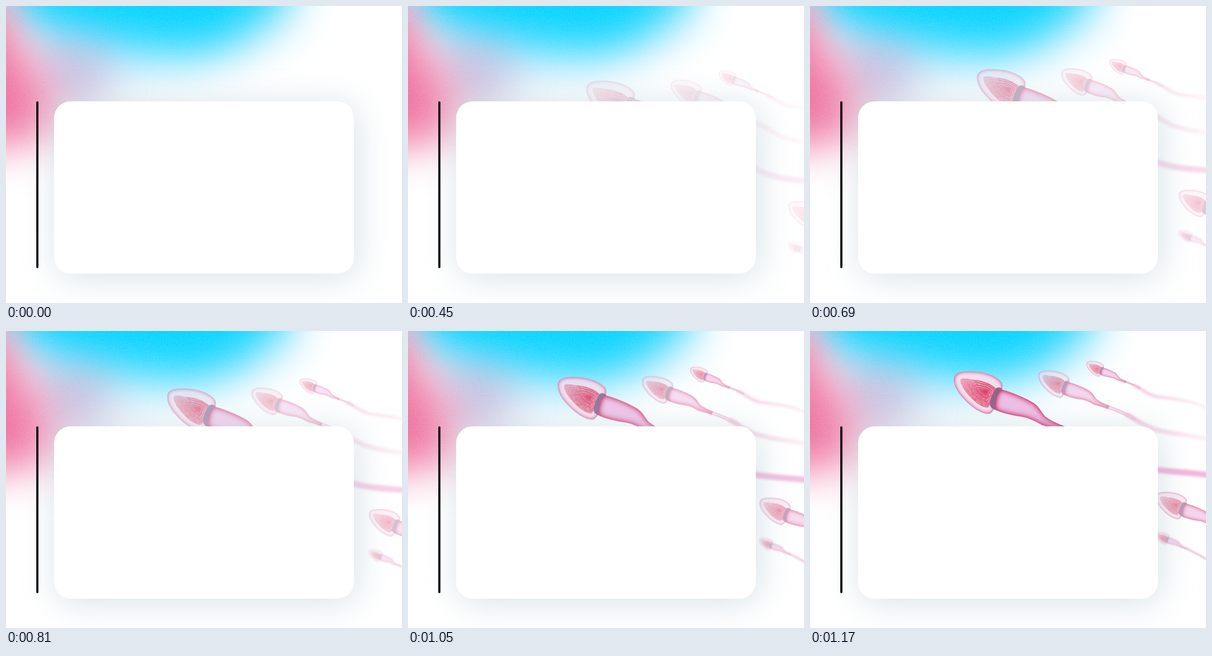
Recreate the animation shown at these times as an HTML page. Size 864 by 648 pixels, loop 1200 ms.

```html
<!DOCTYPE html>
<html lang="en">
<head>
<meta charset="utf-8">
<title>Swimming cells</title>
<style>
  html, body { margin: 0; width: 100%; height: 100%; overflow: hidden; background: #fff; }
  svg { display: block; width: 864px; height: 648px; }
</style>
</head>
<body>
<svg viewBox="0 0 864 648" xmlns="http://www.w3.org/2000/svg">
  <defs>
    <filter id="glow" filterUnits="userSpaceOnUse" x="-400" y="-400" width="1500" height="1200" color-interpolation-filters="sRGB">
      <feGaussianBlur stdDeviation="47"/>
    </filter>
    <filter id="shade" filterUnits="userSpaceOnUse" x="-100" y="0" width="1100" height="800" color-interpolation-filters="sRGB">
      <feGaussianBlur stdDeviation="38"/>
    </filter>
    <filter id="grain" filterUnits="userSpaceOnUse" x="0" y="0" width="864" height="430" color-interpolation-filters="sRGB">
      <feTurbulence type="fractalNoise" baseFrequency=".85" numOctaves="2" seed="4"/>
      <feColorMatrix values="0 0 0 0 1  0 0 0 0 1  0 0 0 0 1  .7 0 0 0 -.32"/>
    </filter>
    <filter id="soft" filterUnits="userSpaceOnUse" x="480" y="40" width="440" height="500" color-interpolation-filters="sRGB">
      <feGaussianBlur stdDeviation="2.6"/>
    </filter>
    <filter id="haze" filterUnits="userSpaceOnUse" x="730" y="410" width="180" height="120" color-interpolation-filters="sRGB">
      <feGaussianBlur stdDeviation="1.4"/>
    </filter>
    <!-- Inner rims: colour the inside of a shape towards its edge -->
    <filter id="rimHead" color-interpolation-filters="sRGB">
      <feGaussianBlur in="SourceAlpha" stdDeviation="4"/>
      <feComponentTransfer result="core"><feFuncA type="linear" slope="1.7" intercept="-.7"/></feComponentTransfer>
      <feFlood flood-color="#d56ba4"/>
      <feComposite operator="out" in2="core"/>
      <feComposite operator="in" in2="SourceAlpha" result="rim"/>
      <feMerge><feMergeNode in="SourceGraphic"/><feMergeNode in="rim"/></feMerge>
    </filter>
    <filter id="rimNeck" color-interpolation-filters="sRGB">
      <feGaussianBlur in="SourceAlpha" stdDeviation="6.5"/>
      <feComponentTransfer result="core"><feFuncA type="linear" slope="1.9" intercept="-.9"/></feComponentTransfer>
      <feFlood flood-color="#dc4478"/>
      <feComposite operator="out" in2="core"/>
      <feComposite operator="in" in2="SourceAlpha" result="rim"/>
      <feMerge><feMergeNode in="SourceGraphic"/><feMergeNode in="rim"/></feMerge>
    </filter>
    <radialGradient id="nucleusFill" gradientUnits="userSpaceOnUse" cx="384" cy="132" r="58">
      <stop offset="0" stop-color="#da3f68"/>
      <stop offset=".35" stop-color="#e16385"/>
      <stop offset="1" stop-color="#eda0b8"/>
    </radialGradient>
    <linearGradient id="fadeOut" gradientUnits="userSpaceOnUse" x1="680" y1="0" x2="875" y2="0">
      <stop offset="0" stop-color="#ec9fc6"/>
      <stop offset="1" stop-color="#f5b8d6" stop-opacity=".3"/>
    </linearGradient>

    <g id="cell" transform="translate(-314 -105)">
      <path fill="#fdf0f7" fill-opacity=".93" filter="url(#rimHead)" d="M314 106C314 92 328 87 350 88C380 88 410 98 419 114C424 125 412 140 407 155C402 170 398 181 388 181C365 179 340 155 326 137C319 127 314 117 314 106Z"/>
      <path id="nucleus" fill="url(#nucleusFill)" d="M328 107C330 101 342 104 354 106C375 107 397 115 406 126C404 140 396 156 389 167C375 168 358 154 345 139C336 129 328 117 328 107Z"/>
      <g id="folds" fill="none" stroke="#fbd3de" stroke-opacity=".55"/>
      <path fill="#efbfe6" filter="url(#rimNeck)" d="M415 127C440 133 470 146 488 157C502 167 504 177 513 186C525 196 540 202 556 208L551 220C535 213 520 209 506 205C490 196 478 190 462 187C440 184 420 179 404 172C402 155 408 137 415 127Z"/>
      <path fill="#94648c" d="M407 124C412 122 418 125 420 127C409 135 403 155 405 172C400 171 395 168 393 163C392 150 399 132 407 124Z"/>
    </g>
  </defs>

  <rect width="864" height="648" fill="#fff"/>
  <path filter="url(#glow)" fill="#8ad9fa" opacity=".42" d="M40 20L640-100L630 40L510 115L380 150L210 175L90 130Z"/>
  <path filter="url(#glow)" fill="#00d2ff" d="M-10-200H660L598 0L545 38L488 78L400 99L250 84L130 62L40 25L5-10Z"/>
  <ellipse filter="url(#glow)" cx="145" cy="150" rx="85" ry="75" fill="#b79acb" opacity=".6"/>
  <path filter="url(#glow)" fill="#ee709e" d="M-200-50L0-20L14 60L80 165L105 240L65 300L-200 314Z"/>
  <rect width="864" height="430" filter="url(#grain)"/>

  <g id="swarm" fill="none" stroke-linecap="round">
    <g opacity=".6">
      <path stroke="#e594bd" stroke-width="7.5" d="M651 166C670 173 690 181 708 192"/>
      <path stroke="#f3c3df" stroke-width="4" d="M651 166C670 173 690 181 708 192"/>
      <path stroke="url(#fadeOut)" stroke-width="10" filter="url(#soft)" d="M692 183C712 193 727 206 748 213C785 225 825 226 880 238"/>
      <use href="#cell" transform="translate(498 97) scale(.64)"/>
    </g>
    <g opacity=".7">
      <path stroke="#e99cc2" stroke-width="4" d="M689 111C700 115 710 119 720 125"/>
      <path stroke="url(#fadeOut)" stroke-width="6.5" filter="url(#soft)" d="M708 119C724 126 734 137 752 142C790 150 815 145 880 173"/>
      <use href="#cell" transform="translate(603 72) scale(.36)"/>
    </g>
    <use href="#cell" transform="translate(754.5 362) scale(.64)" opacity=".64"/>
    <g opacity=".62" filter="url(#haze)">
      <path stroke="#eb9dc5" stroke-width="4.5" d="M820 474C838 482 852 491 880 506"/>
      <use href="#cell" transform="translate(754 444) scale(.28)"/>
    </g>
    <path stroke="#f2a6d4" stroke-width="13" opacity=".82" filter="url(#soft)" d="M640 258C690 288 715 295 745 301C785 308 825 307 880 316"/>
    <use href="#cell" transform="translate(314 105)"/>
  </g>

  <rect x="111" y="216" width="654" height="376" rx="36" fill="#8eafbf" opacity=".36" filter="url(#shade)"/>
  <rect x="105" y="208" width="654" height="376" rx="36" fill="#fff"/>
  <path d="M68.4 210.3V569.7" stroke="#000" stroke-width="4.6" stroke-linecap="round"/>
</svg>
<script>
  const LOOP = 1200, STEP = 30, START = 210, END = 1170, TRAVEL = 100;
  const swarm = document.getElementById('swarm');

  let seed = 7;
  const random = () => (seed = seed * 16807 % 2147483647) / 2147483647;

  // Wrinkles: broken, slightly shifted rings inside the nucleus
  function drawFolds() {
    const outline = document.getElementById('nucleus').getAttribute('d');
    const folds = document.getElementById('folds');
    for (let i = 0; i < 15; i++) {
      const size = 0.22 + i * 0.052;
      const ring = document.createElementNS('http://www.w3.org/2000/svg', 'path');
      const dashes = Array.from({ length: 8 }, () => (3 + random() * 11).toFixed(1));
      const x = 384 + random() * 4 - 2, y = 132 + random() * 4 - 2;
      ring.setAttribute('d', outline);
      ring.setAttribute('transform', `translate(${x} ${y}) rotate(${random() * 12 - 6}) scale(${size}) translate(-384 -132)`);
      ring.setAttribute('stroke-width', 0.8 / size);
      ring.setAttribute('stroke-dasharray', dashes.join(' '));
      folds.append(ring);
    }
  }

  function render(time) {
    const t = Math.floor((time % LOOP) / STEP) * STEP;
    const shift = TRAVEL * (END - t) / (END - START);
    const opacity = t < START ? 0 : (t - START + STEP) / (END - START + STEP);
    swarm.setAttribute('transform', `translate(${shift} ${shift})`);
    swarm.setAttribute('opacity', opacity);
  }

  drawFolds();
  render(0);
  const origin = performance.now();
  function tick() {
    render(performance.now() - origin);
    requestAnimationFrame(tick);
  }
  requestAnimationFrame(tick);
</script>
</body>
</html>
```
